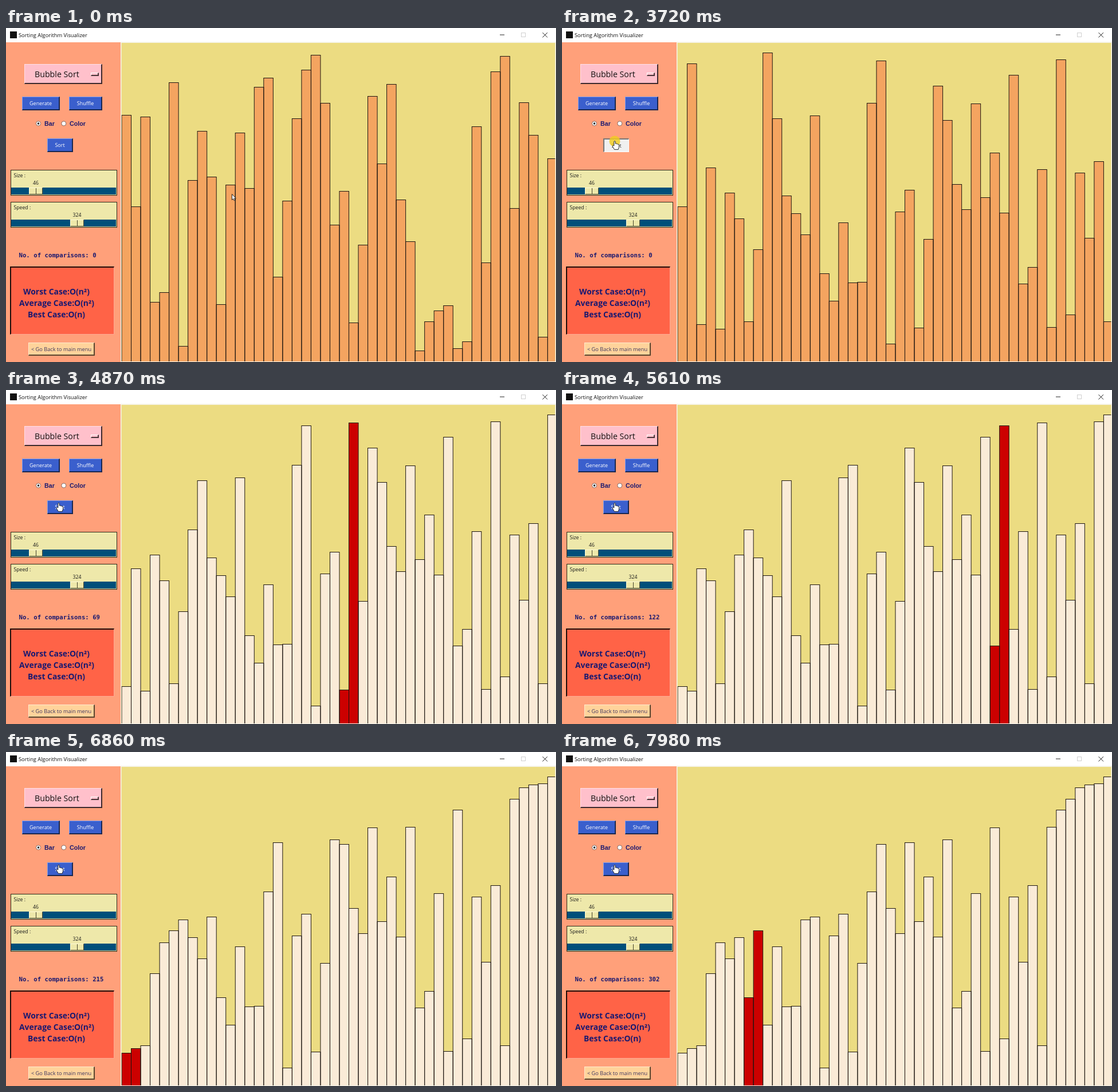
Write an HTML page with a canvas that moves like this. It is 960 px wide and 584 px high and loops after 8000 ms.

```html
<!DOCTYPE html>
<html lang="en">
<head>
<meta charset="utf-8">
<title>Sorting Algorithm Visualizer</title>
<style>
html, body { margin: 0; width: 100%; height: 100%; overflow: hidden; background: #fff; }
#stage { position: relative; width: 960px; height: 584px; overflow: hidden; font-family: "Open Sans", sans-serif; }
#stage > * { position: absolute; }
canvas, svg { left: 0; top: 0; display: block; }
#side { left: 0; top: 24.5px; width: 200px; height: 560px; background: #ffa07a; }
.bevel {
  box-sizing: border-box; display: flex; align-items: center; justify-content: center;
  border: solid; border-width: 1px 2px 2px 1px; white-space: nowrap;
}
.btn { background: #3a5fcd; border-color: #7c9bee #1a2850 #1a2850 #7c9bee; color: #fff; font-size: 9px; }
.btn.down {
  background: #f0f0f0; border-color: #777 #fff #fff #777; border-width: 2px 1px 1px 2px; color: #222;
}
#menu {
  left: 32px; top: 63px; width: 136px; height: 35px; font-size: 14.2px; color: #111;
  background: #ffc0cb; border-color: #ffe0e6 #3d2a2d #3d2a2d #ffe0e6;
  justify-content: flex-start; padding-left: 17px;
}
#tick { left: 148px; top: 78px; width: 14px; height: 6px; background: #ffc0cb; border-color: #fff #4a3438 #4a3438 #fff; }
#case {
  left: 7px; top: 417px; width: 182px; height: 119px; background: #ff6347;
  border-width: 2px 1px 1px 2px; border-color: #1c0b08 #ffa893 #ffa893 #1c0b08;
}
#back {
  left: 39px; top: 550px; width: 116px; height: 23px; font-size: 9.2px; color: #3a3560;
  background: #ffd39b; border-color: #ffebcf #59462f #59462f #ffebcf;
}
.scale { left: 8px; width: 186px; height: 45px; box-sizing: border-box; background: #eee8aa; border: 1px solid #2a2818; }
.scale i {
  position: absolute; left: 0; top: 30px; width: 184px; height: 13px; box-sizing: border-box;
  background: #004f7a; border: solid #d8d4a0; border-width: 0 1px 1px 0;
}
.scale b {
  position: absolute; top: 30px; width: 24px; height: 12px; background: #eee8aa;
  border-width: 1px; border-color: #fffbd8 #4e4b30 #4e4b30 #fffbd8;
}
.scale b::after { content: ""; width: 1px; height: 10px; background: #45422c; }
.small { font-size: 8.7px; fill: #1a1a1a; }
.radio { font: bold 10.7px "Liberation Sans", sans-serif; fill: #191970; }
.count { font: bold 10.7px "DejaVu Sans Mono", monospace; fill: #191970; white-space: pre; }
.big { font-size: 13.9px; font-weight: 700; fill: #191970; text-anchor: middle; }
</style>
</head>
<body>
<div id="stage">
  <canvas id="chart" width="960" height="584"></canvas>
  <div id="side"></div>
  <div id="menu" class="bevel">Bubble Sort</div>
  <div id="tick" class="bevel"></div>
  <div id="generate" class="bevel btn" style="left:28px;top:120px;width:66px;height:24px">Generate</div>
  <div class="bevel btn" style="left:110px;top:120px;width:58px;height:24px">Shuffle</div>
  <div id="sort" class="bevel btn" style="left:72px;top:193px;width:45px;height:24px">Sort</div>
  <div class="scale" style="top:248px"><i></i><b class="bevel" style="left:31px"></b></div>
  <div class="scale" style="top:304px"><i></i><b class="bevel" style="left:103px"></b></div>
  <div id="case" class="bevel"></div>
  <div id="back" class="bevel">&lt; Go Back to main menu</div>

  <svg width="960" height="584">
    <rect x="7" y="6" width="12" height="12" fill="#111"/>
    <text x="22" y="15.5" font-size="9.3" fill="#111">Sorting Algorithm Visualizer</text>
    <g fill="none" stroke="#222">
      <path d="M862 12h8"/>
      <rect x="899.5" y="8.5" width="7" height="7" stroke="#d0d0d0"/>
      <path d="M936.5 8l8.5 8.5m0-8.5l-8.5 8.5"/>
    </g>

    <g fill="#fff" stroke="#6b5048" stroke-width=".8">
      <circle cx="56.5" cy="167" r="4"/>
      <circle cx="100.8" cy="167" r="4"/>
    </g>
    <circle cx="56.5" cy="167" r="1.7" fill="#111"/>
    <text class="radio" x="67" y="171">Bar</text>
    <text class="radio" x="111" y="171">Color</text>

    <text class="small" x="13.5" y="260.5">Size :</text>
    <text class="small" x="52" y="274" text-anchor="middle">46</text>
    <text class="small" x="13.5" y="316.5">Speed :</text>
    <text class="small" x="124" y="330" text-anchor="middle">324</text>

    <text id="count" class="count" x="22.5" y="400.5"></text>
    <text class="big" x="88" y="466">Worst Case:O(n²)</text>
    <text class="big" x="88.5" y="486">Average Case:O(n²)</text>
    <text class="big" x="88" y="506">Best Case:O(n)</text>

    <g id="cursor" fill="#fff" stroke="#111" stroke-width=".9" stroke-linejoin="round">
      <circle id="glow" cy="1" r="9.5" fill="#f0cc20" fill-opacity=".82" stroke="none"/>
      <path id="arrow" d="M.4 .5V10.6L2.7 8.5 4.2 11.8 5.9 11 4.5 7.9H7.4Z"/>
      <path id="hand" d="M-1.2 9V1.4Q0 -.4 1.2 1.4V5.2Q2.6 4.4 3.4 5.7Q4.9 5 5.5 6.4Q7.3 6 7.5 7.8V11.2L6.2 15.4H-.6L-3.6 10.4Q-4.2 8.4 -2.6 8.2Z"/>
    </g>
  </svg>
</div>
<script>
const LOOP = 8000, FRAME = 46.47;
const GENERATED = 2470, PRESS = 3720, START = 3900;

// Bar tops in pixels: the smaller the number, the taller the bar.
const before = [152, 312, 155, 479, 462, 95, 556, 266, 180, 260, 483, 274, 183, 280, 103, 87,
  435, 302, 158, 73, 47, 131, 344, 285, 515, 379, 119, 237, 98, 300, 373, 564,
  513, 494, 485, 560, 548, 172, 410, 76, 49, 315, 130, 187, 540, 228];
const after = [312, 62, 518, 244, 526, 288, 333, 513, 387, 43, 158, 293, 324, 361, 153, 429,
  477, 340, 445, 444, 131, 57, 552, 321, 283, 524, 369, 101, 161, 273, 317, 132,
  296, 218, 323, 82, 447, 418, 247, 523, 55, 501, 253, 367, 233, 513];

// Screen refreshes come in bursts; progress is [refresh, comparisons].
const bursts = [START, 4740, 5560, 6400, 7240];
const progress = [[0, 0], [1, 1], [21, 69], [37, 122.5], [53, 177], [75, 254.5], [88, 302]];

// Cursor moves: start time, refreshes, then from / control / to.
const moves = [
  { at: 510, steps: 7, path: [[394, 290], [325, 240], [260, 186]] },
  { at: 1070, steps: 12, path: [[260, 186], [150, 99], [92, 132]] },
  { at: 1990, steps: 1, path: [[92, 132], [91, 132], [90, 132]] },
  { at: 2650, steps: 18, path: [[90, 132], [100, 160], [92, 196]] },
  { at: 3490, steps: 1, path: [[92, 196], [92, 196], [92, 197]] }
];
const buttons = [[28, 120, 94, 144], [110, 120, 168, 144], [72, 193, 117, 217]];

const $ = id => document.getElementById(id);
const ctx = $("chart").getContext("2d");
const refreshes = ms => Math.floor(ms / FRAME + 0.25);
const show = (el, on) => el.setAttribute("visibility", on ? "visible" : "hidden");

function comparisons(t) {
  if (t < START) return 0;
  const burst = bursts.findLastIndex(s => t >= s);
  const k = burst * 18 + Math.min(17, refreshes(t - bursts[burst]));
  const i = Math.min(progress.length - 2, progress.findLastIndex(p => k >= p[0]));
  const [k0, c0] = progress[i], [k1, c1] = progress[i + 1];
  return Math.min(302, c0 + (k - k0) * (c1 - c0) / (k1 - k0));
}

function bubble(n) {
  const a = [...after];
  let done = 0, pair = -9;
  for (let end = a.length - 1; end > 0; end--) {
    for (let j = 0; j < end; j++) {
      if (done++ >= n) return { a, pair };
      pair = j;
      if (a[j] < a[j + 1]) [a[j], a[j + 1]] = [a[j + 1], a[j]];
    }
  }
  return { a, pair };
}

function drawChart(a, pair, color) {
  const edge = i => 202 + i * 16.52;
  ctx.fillStyle = "#f6f4ea";
  ctx.fillRect(200, 24.5, 760, 560);
  ctx.save();
  ctx.beginPath();
  ctx.rect(201.5, 26, 757, 557);
  ctx.clip();
  ctx.fillStyle = "#ecdc82";
  ctx.fillRect(201, 26, 758, 558);
  ctx.strokeStyle = "#1c1510";
  a.forEach((top, i) => {
    const box = [edge(i), top + 0.5, edge(i + 1) - edge(i), 600 - top];
    ctx.fillStyle = i === pair || i === pair + 1 ? "#cc0000" : color;
    ctx.fillRect(...box);
  });
  a.forEach((top, i) => ctx.strokeRect(edge(i), top + 0.5, edge(1) - edge(0), 600 - top));
  ctx.restore();
}

function cursorAt(t) {
  const move = moves.findLast(m => t >= m.at);
  if (!move) return moves[0].path[0];
  const p = Math.min(1, (refreshes(t - move.at) + 1) / move.steps);
  const e = p * p * (3 - 2 * p), r = 1 - e;
  const [a, b, c] = move.path;
  return [0, 1].map(i => Math.round(r * r * a[i] + 2 * r * e * b[i] + e * e * c[i]));
}

function render(t) {
  const c = comparisons(t);
  if (c > 0) {
    const { a, pair } = bubble(Math.ceil(c));
    drawChart(a, pair, "#faebd7");
  } else {
    drawChart(t < GENERATED ? before : after, -9, "#f4a460");
  }
  $("count").textContent = "No. of comparisons: " + Math.floor(c);

  const generating = t >= 2240 && t < GENERATED;
  const sorting = t >= PRESS && t < START;
  $("generate").classList.toggle("down", generating);
  $("sort").classList.toggle("down", sorting);

  const [x, y] = cursorAt(t);
  const over = buttons.some(([l, top, r, b]) => x >= l && x < r && y >= top && y < b);
  $("cursor").setAttribute("transform", `translate(${x} ${y})`);
  show($("glow"), generating || sorting);
  show($("hand"), over);
  show($("arrow"), !over);
}

const origin = performance.now();
function tick() {
  render((performance.now() - origin) % LOOP);
  requestAnimationFrame(tick);
}
tick();
</script>
</body>
</html>
```
